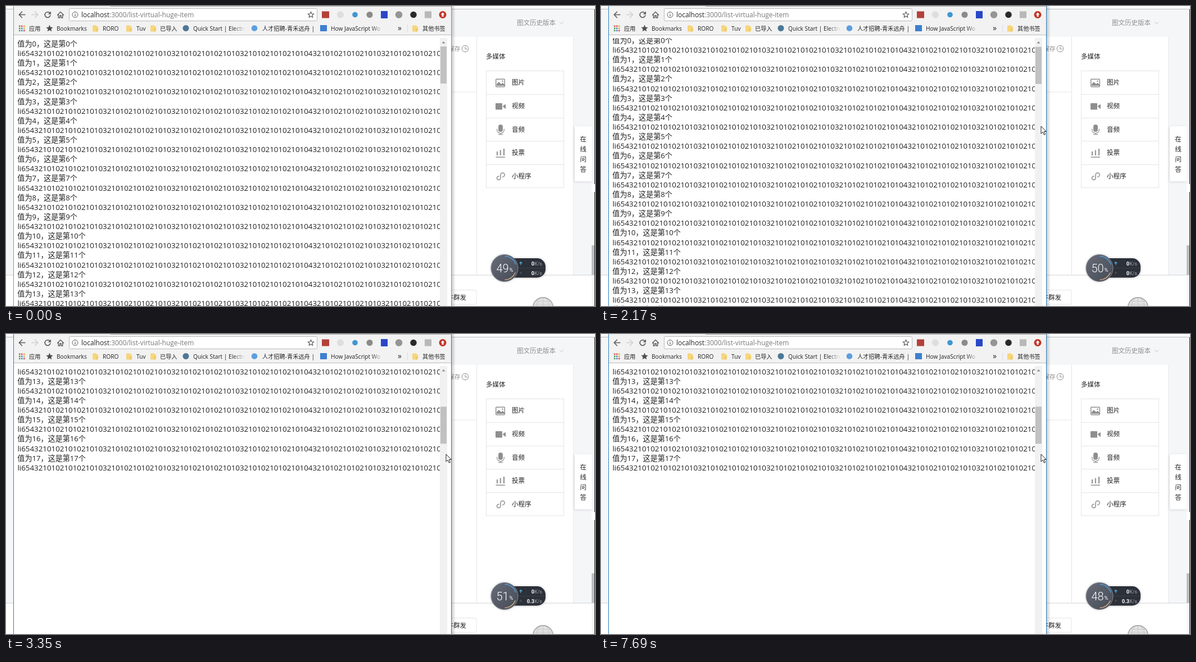
An HTML page that plays this animation: 1048x534 px, repeating every 8 s.

```html
<!DOCTYPE html>
<html lang="zh-CN">
<head>
<meta charset="utf-8">
<title>Virtual list</title>
<style>
html, body { margin: 0; width: 100%; height: 100%; overflow: hidden; background: #fff; }
svg { display: block; font-family: "Open Sans", "Noto Sans CJK SC", sans-serif; }
.line { fill: none; stroke-linecap: round; stroke-linejoin: round; }
.pct { font-family: Roboto, sans-serif; font-weight: 300; }
.rate { font-family: Roboto, sans-serif; }
</style>
</head>
<body>
<svg id="stage" width="1048" height="534" viewBox="0 0 1048 534"></svg>
<script>
const stage = document.getElementById('stage');
const LOOP = 8000, PITCH = 34.23;

const rect = (x, y, w, h, fill, more = '') =>
  `<rect x="${x}" y="${y}" width="${w}" height="${h}" fill="${fill}" ${more}/>`;
const circle = (x, y, r, fill, more = '') =>
  `<circle cx="${x}" cy="${y}" r="${r}" fill="${fill}" ${more}/>`;
const line = (d, color, width = 1, more = '') =>
  `<path class="line" d="${d}" stroke="${color}" stroke-width="${width}" ${more}/>`;
const shape = (d, fill, more = '') => `<path d="${d}" fill="${fill}" ${more}/>`;
// y is the middle of the capitals
const text = (x, y, s, size, fill = '#222', more = '') =>
  `<text x="${x}" y="${y + size * .36}" font-size="${size}" fill="${fill}" ${more}>${s}</text>`;

function star(x, y, r) {
  let d = '';
  for (let i = 0; i < 10; i++) {
    const a = i * Math.PI / 5, k = i % 2 ? r * .45 : r;
    d += (i ? 'L' : 'M') + (x + k * Math.sin(a)).toFixed(2) + ' ' + (y - k * Math.cos(a)).toFixed(2);
  }
  return d + 'Z';
}

const defs = `<defs>
  <clipPath id="view"><rect x="14" y="57" width="758" height="477"/></clipPath>
  <linearGradient id="fade"><stop stop-color="#f2f2f2" stop-opacity="0"/><stop offset="1" stop-color="#f2f2f2"/></linearGradient>
  <linearGradient id="shade"><stop stop-opacity=".2"/><stop offset="1" stop-opacity="0"/></linearGradient>
  <linearGradient id="dial" x2="1" y2="1"><stop stop-color="#686d79"/><stop offset="1" stop-color="#444956"/></linearGradient>
  <filter id="soft" x="-30%" y="-30%" width="160%" height="160%"><feGaussianBlur stdDeviation="2"/></filter>
</defs>`;

function editor() {
  const gray = '#8f8f8f', edge = '#e4e5e8';
  const rows = ['图片', '视频', '音频', '投票', '小程序'];
  let s = rect(0, 0, 1048, 534, '#fff') + rect(0, 6, 1048, 473, '#f5f6f8') +
    rect(0, 5, 1048, 1, '#b8b8b8') +
    rect(780, 55, 229, 424, '#fff') + rect(1009, 55, 1, 424, '#ececef') +
    rect(837, 55, 1, 424, edge) + rect(780, 152.5, 57, 1, edge) +
    rect(0, 478.5, 1048, 1, '#d2d3d5') +
    text(909, 30, '图文历史版本', 11.5, gray) + line('M985 28.5l3.5 3.5 3.5-3.5', '#c4c4c4') +
    text(787, 76, '保存', 10.7, gray) +
    circle(817, 76, 5.8, 'none', `stroke="${gray}"`) + line('M817 72.5V76.5h3.2', gray) +
    text(854, 90, '多媒体', 11.5) +
    rect(854.5, 115.5, 138, 208, '#fff', `stroke="${edge}"`);
  rows.forEach((label, i) => {
    const y = 136.3 + i * 41.6;
    if (i) s += rect(854, Math.round(y - 20.8), 138, 1, edge);
    s += text(900, y, label, 11.5);
  });
  s += rect(871.7, 130.2, 15.6, 13.6, 'none', `rx="1" stroke="${gray}" stroke-width="1.5"`) +
    shape('M873 142v-3l4-4 4 4 2.5-2.5 3.5 3.5v2z', gray) + circle(883.5, 133.8, 1.3, gray) +
    rect(871, 173, 12, 11.5, gray, 'rx="1"') + shape('M883.5 178.5l5.5-4v9z', gray) +
    rect(876, 211, 8, 13, gray, 'rx="4"') +
    line('M873.7 219v1.5a6.3 6 0 0 0 12.6 0V219M880 227v1.5M876.5 228.7h7', gray, 1.2) +
    line('M872 269h15.5', gray, 1.3) + rect(873, 259, 2, 7, gray) +
    rect(878.8, 256.5, 2, 9.5, gray) + rect(885, 254, 2, 12, gray) +
    line('M877 303a3.3 3.3 0 1 0 3 3.3V300.5a3.6 3.6 0 1 1 3.6 3.6', gray, 1.5);
  // side tab
  s += rect(1011, 215, 31, 98, '#000', 'opacity=".12" filter="url(#soft)"') + rect(1012, 214, 30, 98, '#fff');
  [...'在线问答'].forEach((c, i) => s += text(1027, 237 + i * 18, c, 11.5, '#222', 'text-anchor="middle"'));
  // page edge
  s += rect(1042, 6, 5, 528, '#f7f7f7') + rect(1042, 426, 6, 53, '#bdbdbd') +
    rect(1047, 6, 1, 311, '#222') + rect(1042, 317, 6, 14, '#fff') + rect(1047, 331, 1, 203, '#222');
  // footer
  s += rect(770.5, 505.5, 66.5, 25.5, '#fff', `rx="2" stroke="${edge}"`) +
    text(784.5, 518.5, '件群发', 11.5) +
    circle(955.5, 537, 18, '#e2e2e2', 'stroke="#9a9a9a" stroke-width="1.3"') +
    line('M955.5 520v14M949 521q-5 6-5 13M962 521q5 6 5 13M943 525.5h25M939 531h33', '#c8c8c8');
  return s;
}

function toolbar() {
  const ink = '#5a5a5a';
  const folder = x => shape(`M${x - 5} 34.5h7l1 2h2v9h-10z`, '#f6d67b') +
    line(`M${x + 2} 45.5v-4.5h3`, '#e3b64b', .8);
  const label = (x, s) => text(x, 40, s, 10.2);
  let s = rect(14, 0, 778, 51, '#f2f2f2') + rect(14, 51, 778, 1, '#bcbcbc') +
    line('M186 0.5H792', '#a9a9a9') +
    line('M34 15.5H23.5M28.5 10.3L23.3 15.5l5.2 5.2', ink, 1.6) +
    line('M46 15.5H56.5M51.5 10.3l5.2 5.2-5.2 5.2', '#cfcfcf', 1.6) +
    line('M77.7 12.3a4.9 4.9 0 1 0 1.1 4.5', ink, 1.6) + shape('M80 9.5v5.2h-5.2z', ink) +
    line('M91.5 16l5.5-5.5 5.5 5.5M93.3 15v6h2.5v-4h2.4v4h2.5v-6', ink, 1.4) +
    rect(112.5, 4.5, 441, 22, '#fff', 'rx="2" stroke="#b9b9b9"') +
    circle(123, 15.5, 5, 'none', `stroke="${ink}"`) + line('M123 15v3M123 12.8v.1', ink, 1.2) +
    text(134, 15.5, 'localhost<tspan fill="#777">:3000/list-virtual-huge-item</tspan>', 11.95) +
    line(star(542.5, 15.8, 5.6), ink, 1.2);
  // extension buttons
  s += rect(562, 9.5, 13, 12, '#b5403a') + circle(595, 15.5, 6, '#dedede') +
    circle(621, 15.5, 4.8, '#3f97d3') + circle(647, 15.5, 5.5, '#8a8a8a') +
    rect(667, 9, 12, 13, '#2947c8') + circle(699, 15.5, 6.3, '#959595') +
    circle(725, 15.5, 5.7, '#292929') + rect(745, 9.5, 12, 12, '#b8b8b8') +
    circle(777, 15.5, 6.5, '#c33427') + shape('M777 11.5l3.5 3.8h-2v3.7h-3v-3.7h-2z', '#fff');
  // bookmarks
  const dots = ['#d6554a', '#d6554a', '#e7a83c', '#4b9a5b', '#4a86d0', '#e7a83c', '#4b9a5b', '#4a86d0', '#d6554a'];
  dots.forEach((c, i) => s += rect(23 + i % 3 * 4, 34.5 + (i / 3 | 0) * 4, 2.6, 2.6, c));
  s += shape(star(77.5, 40, 6.5), '#4d4d4d') + [159, 219, 262, 728].map(folder).join('') +
    label(41, '应用') + label(90, 'Bookmarks') + label(172, 'RORO') + label(232, 'Tuv') +
    label(274, '已导入') + circle(320, 39.5, 5.5, '#4c7896') + label(333, 'Quick Start | Electro') +
    circle(442, 39.5, 5.3, '#5b9fe0') + label(456, '人才招聘-青禾远舟 |') +
    rect(559, 34, 12, 11, '#3c7fd0') + label(578, 'How JavaScript Wo') +
    rect(405, 32, 21, 16, 'url(#fade)') + rect(426, 32, 8, 16, '#f2f2f2') +
    rect(650, 32, 21, 16, 'url(#fade)') + rect(671, 32, 22, 16, '#f2f2f2') +
    text(697, 39, '»', 14) + rect(714, 33, 1, 14, '#dcdcdc') + label(741, '其他书签');
  return s;
}

function list() {
  const nest = n => n ? n + nest(n - 1).repeat(n) : '0';
  const body = 'li' + ('65' + nest(4).repeat(2)).slice(0, 106);
  let s = '';
  for (let i = 0; i < 18; i++) {
    const y = 67.1 + i * PITCH;
    s += text(20.3, y, `值为${i}，这是第${i}个`, 13.1) + text(20.5, y + PITCH / 2, body, 13.33);
  }
  return `<g clip-path="url(#view)"><g id="list">${s}</g></g>`;
}

function browser() {
  return rect(793, 0, 7, 534, 'url(#shade)') + rect(13, 0, 779, 534, '#fff') +
    toolbar() + list() +
    rect(772, 57, 13, 477, '#f1f1f1') + shape('M775.5 66.5l3-3.5 3 3.5z', '#8a8a8a') +
    rect(773, 72, 11, 66, '#c1c1c1', 'id="thumb"') +
    `<g id="border">${rect(13, 0, 1, 534, 'inherit') + rect(792, 0, 1, 534, 'inherit')}</g>`;
}

function meter() {
  const rate = (id, y) =>
    text(940, y, '0', 9.3, '#fff', `id="${id}" class="rate" font-weight="700" text-anchor="end"`) +
    text(940.5, y, 'K/s', 8.6, '#a4a8b0', 'class="rate"');
  return rect(880, 449, 81, 35, '#000', 'rx="16" opacity=".2" filter="url(#soft)"') +
    circle(887, 466.5, 24.5, '#000', 'opacity=".2" filter="url(#soft)"') +
    rect(885, 449, 75, 34.5, '#2c3039', 'rx="15"') + rect(911, 466, 48, 1, '#3b404a') +
    circle(887, 466.5, 24, 'url(#dial)', 'stroke="#868a93"') +
    line('M888 445.5a21 21 0 0 1 19 14', '#4f9ddb', 1.5) +
    line('M906 475a21 21 0 0 1-18 12.5', '#d0ae7e', 1.5) +
    line('M916 460.5v-4.5M914 457.7l2-2 2 2', '#58b5e8', 1.2) +
    circle(916, 475, 2, '#444a55') +
    text(872.5, 466.3, '49', 20, '#fff', 'id="pct" class="pct"') +
    text(895.5, 469.7, '%', 9.5, '#fff', 'class="rate"') +
    rate('up', 458.7) + rate('down', 475.7);
}

const pointer = shape('M0 0V13.2L3.1 10.3 5.3 15.3 7.5 14.3 5.3 9.5H9.3Z', '#fff',
  'id="pointer" stroke="#222" stroke-width="1" stroke-linejoin="round"');

stage.innerHTML = defs + editor() + browser() + meter() + pointer;
const el = id => document.getElementById(id);

// each entry: start time, then the values held until the next one
const scrolls = [[0, 0], [2170, 5.8], [2260, 214], [2340, 428]];
const loads = [[0, 49, 0, 0], [300, 48, 0, .3], [1300, 50, 0, 0], [3350, 51, 0, .3], [4430, 50, 0, 0],
  [5430, 49, .1, .2], [6370, 49, 0, 0], [6610, 47, 0, 0], [7390, 47, 0, .3], [7690, 48, 0, .3]];
const moves = [[0, -40, -40], [220, 760, 499], [300, 750, 458], [380, 746, 420],
  [680, 750, 406], [760, 762, 378], [840, 779, 346], [910, 792, 322], [990, 798, 309],
  [1160, 796, 284], [1230, 792, 252], [1300, 788, 228], [1380, 785, 214],
  [1540, 788, 214], [1620, 791, 214], [1700, 785, 214], [1930, 784, 214], [2020, 783, 214]];
const held = (track, t) => track.findLast(k => k[0] <= t);

function draw(now) {
  const t = now % LOOP;
  const [, scroll] = held(scrolls, t), [, pct, up, down] = held(loads, t), [, x, y] = held(moves, t);
  el('list').setAttribute('transform', `translate(0 ${-scroll})`);
  el('thumb').setAttribute('y', 72 + scroll * .134);
  el('border').setAttribute('fill', t < 2170 ? '#939393' : '#2f80bd');
  el('pointer').setAttribute('transform', `translate(${x} ${y})`);
  el('pct').textContent = pct;
  el('up').textContent = up;
  el('down').textContent = down;
}

const start = performance.now();
function tick() {
  draw(performance.now() - start);
  requestAnimationFrame(tick);
}
tick();
</script>
</body>
</html>
```
